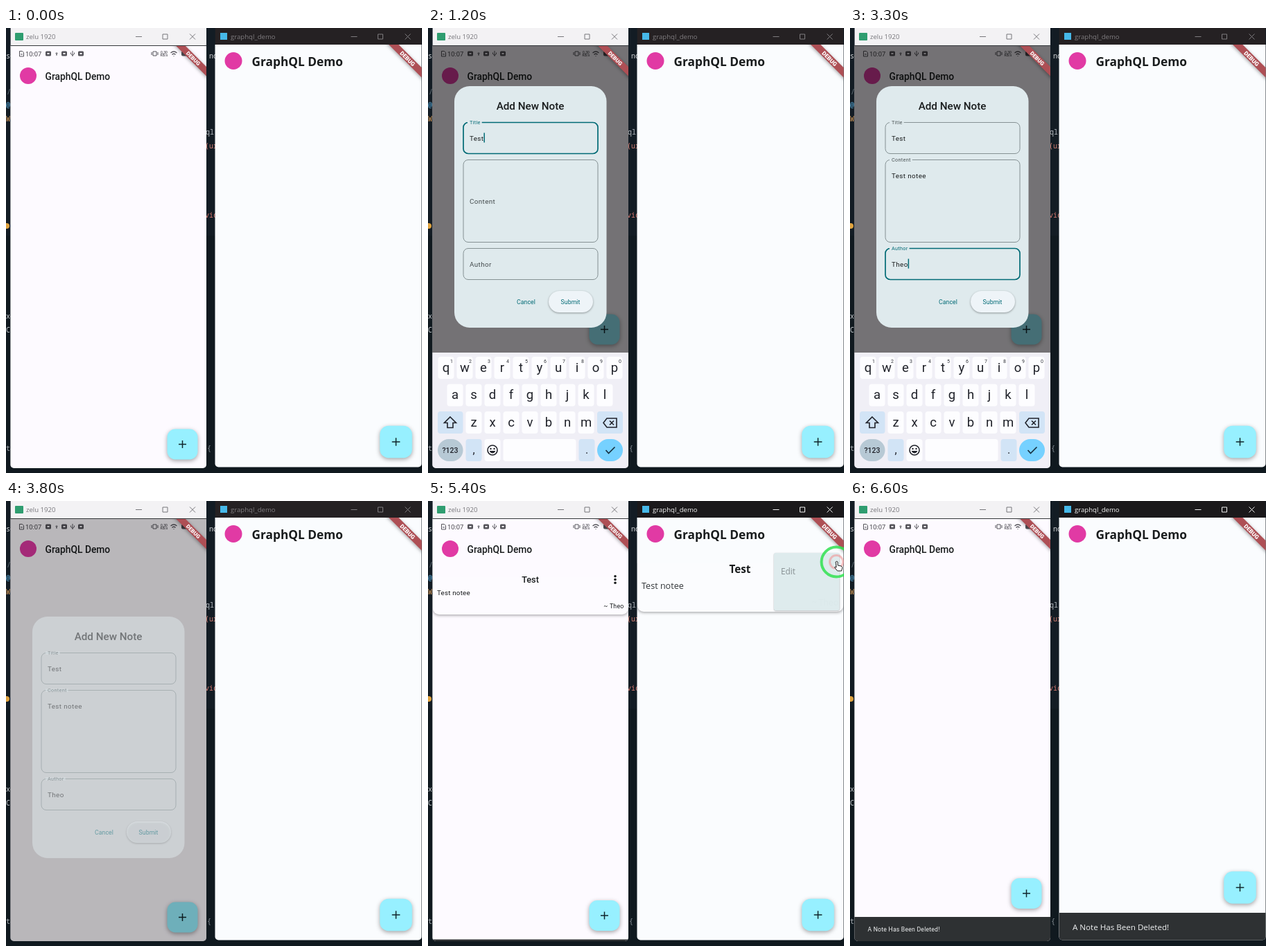
These frames come from a looping animation (600x643 px, 6900 ms). An HTML page with a canvas:

```html
<!DOCTYPE html>
<html lang="en">
<head>
<meta charset="utf-8">
<title>GraphQL Demo</title>
<style>
  html, body { margin: 0; width: 100%; height: 100%; overflow: hidden; background: #131c24; }
  canvas { display: block; }
</style>
</head>
<body>
<canvas id="stage" width="600" height="643"></canvas>
<script>
const c = document.getElementById('stage').getContext('2d');
const LOOP = 6900, STEP = 100;
const ROBOTO = 'Roboto, sans-serif', SANS = '"Open Sans", sans-serif', MONO = '"Noto Sans Mono", monospace';
const AUTHOR = 'Theo', TEAL = '#006a75', CYAN = '#97f0ff', INK = '#191c1d';

const ramp = (t, from, to) => {
  const p = Math.min(1, Math.max(0, (t - from) / (to - from)));
  return p * p * (3 - 2 * p);
};
// Rises over [a, b], falls over [d, e]
const pulse = (t, a, b, d, e) => ramp(t, a, b) * (1 - ramp(t, d, e));
const typed = (text, t, start) => text.slice(0, Math.max(0, Math.floor((t - start) / STEP) + 1));

function text(s, x, y, font, color, align = 'left', spacing = 0) {
  c.font = font;
  c.fillStyle = color;
  c.textAlign = align;
  c.letterSpacing = spacing + 'px';
  c.fillText(s, x, y);
}

function box(x, y, w, h, r, fill, shadow = 0) {
  c.save();
  if (shadow) {
    c.shadowColor = 'rgba(0,0,0,.36)';
    c.shadowBlur = shadow;
    c.shadowOffsetY = shadow / 3;
  }
  c.fillStyle = fill;
  c.beginPath();
  c.roundRect(x, y, w, h, r);
  c.fill();
  c.restore();
}

function dot(x, y, r, fill) {
  c.fillStyle = fill;
  c.beginPath();
  c.arc(x, y, r, 0, 7);
  c.fill();
}

function ring(x, y, r, color, width) {
  c.strokeStyle = color;
  c.lineWidth = width;
  c.beginPath();
  c.arc(x, y, r, 0, 7);
  c.stroke();
}

function path(d, color, width, x = 0, y = 0, fill) {
  c.save();
  c.translate(x, y);
  const p = new Path2D(d);
  if (fill) { c.fillStyle = fill; c.fill(p); }
  c.strokeStyle = color;
  c.lineWidth = width;
  c.stroke(p);
  c.restore();
}

function clipped(x, y, w, h, r, draw) {
  c.save();
  c.beginPath();
  c.roundRect(x, y, w, h, r);
  c.clip();
  draw();
  c.restore();
}

function windowBar(x, w, h, fill, color, name, nameColor, icon) {
  box(x, 0, w, h, 0, fill);
  box(...icon);
  text(name, x + 22.5, 16, '9.6px ' + SANS, nameColor);
  const r = x + w;
  path(`M${r - 102} 12.5h9M${r - 63} 9h7v7h-7zM${r - 24} 8.5l8 8m0-8l-8 8`, color, 1);
}

function banner(x, y, k) {
  c.save();
  c.translate(x, y);
  c.rotate(Math.PI / 4);
  c.scale(k, k);
  box(-60, 28, 120, 12, 0, '#ae4f55', 5);
  text('DEBUG', 0, 37.7, '800 10px ' + ROBOTO, '#fff', 'center');
  c.restore();
}

function fab(x, y, size) {
  box(x - size / 2, y - size / 2, size, size, size * .27, CYAN, 6);
  const arm = size / 8;
  path(`M${-arm} 0h${2 * arm}M0 ${-arm}v${2 * arm}`, '#10262b', 1.5, x, y);
}

function menuDots(x, y, gap) {
  for (const i of [-1, 0, 1]) dot(x, y + i * gap, 1.8, INK);
}

function backdrop() {
  box(0, 0, 600, 643, 0, '#131c24');
  box(0, 300, 600, 343, 0, '#10191f');
  const code = [
    ['se', 0, 44, '#d5d8da'], ['no', 293, 44, '#d5d8da'], ['/', 1, 96, '#64727b'],
    ['@', 0, 115, '#57a9d8'], ['W', 0, 135, '#e0a15c'], ['ql', 288, 154, '#b8bdc2'],
    ['(ur', 287, 174, '#d78075'], ['vic', 287, 274, '#d77a70'], ['xe', 0, 420, '#c3c8cc'],
    ['C', 0, 440, '#c3c8cc'], ['ta', 0, 611, '#a9b0b5'], ['{', 290, 611, '#8c959b']
  ];
  for (const [s, x, y, color] of code) text(s, x, y, '10px ' + MONO, color);
  dot(1, 286, 4, '#e0a33e');
}

function statusBar() {
  const grey = '#55545a';
  text('10:07', 28, 41, '9.4px ' + ROBOTO, '#45444a');
  path('M19.5 33.5h4l2 2v5.5h-6zM21 38h3', grey, 1);
  for (const x of [57, 80, 104]) {
    box(x, 33.5, 8, 7, 1.5, grey);
    box(x + 2.5, 36, 3, 2, 0, '#fdfaff');
  }
  path('M73 35v5M71.5 36.5l1.5 1.5 1.5-1.5M96 33v8M93.5 35.5v2l2.5 2 2.5-2v-2', grey, 1);
  path('M212 34h5v6h-5zM210 35v4M219 35v4', grey, 1);
  text('0.30', 228, 36.5, '500 5px ' + ROBOTO, grey, 'center');
  text('KB/s', 228, 41, '500 5px ' + ROBOTO, grey, 'center');
  path('M237.5 36q4.5-4 9 0M239.5 38.5q2.5-2.5 5 0M241.5 40.5h1', grey, 1.2);
  box(253, 33.5, 12, 7, 2, grey);
}

function field(label, value, x, y, h, focused, emptyY, valueY) {
  const active = focused || value;
  c.strokeStyle = focused ? TEAL : '#7b878a';
  c.lineWidth = focused ? 1.7 : .9;
  c.beginPath();
  c.roundRect(x, y, 194, h, 7);
  c.stroke();
  if (!active) return text(label, 60, emptyY, '9.8px ' + ROBOTO, '#434a4c', 'left', .4);
  c.font = '7.3px ' + ROBOTO;
  c.letterSpacing = '.3px';
  box(57, y - 2, c.measureText(label).width + 5, 4, 0, '#dfeaed');
  text(label, 60, y + 2.6, '7.3px ' + ROBOTO, focused ? TEAL : '#4a5254', 'left', .3);
  text(value, 60, valueY, '9.8px ' + ROBOTO, INK, 'left', .4);
  if (focused) box(60 + c.measureText(value).width, valueY - 11, 1.5, 14, 0, TEAL);
}

function dialog(t, kb) {
  const opacity = pulse(t, 200, 400, 3700, 3900);
  if (!opacity) return;
  c.save();
  c.globalAlpha = opacity;
  box(6, 25, 283, 611, 0, 'rgba(0,0,0,.54)');
  c.translate(0, 83 * (1 - kb));
  box(38, 84, 219.5, 349, 22, '#dfeaed');
  text('Add New Note', 147.5, 118, '500 15.2px ' + ROBOTO, INK, 'center');
  const focus = t < 500 || t >= 3500 ? -1 : t < 1400 ? 0 : t < 2800 ? 1 : 2;
  const content = typed(t < 2200 ? 'Test n' : 'Test notee', t, 1600);
  field('Title', typed('Test', t, 900), 51, 136.5, 45, focus === 0, 162.5, 162.5);
  field('Content', content, 51, 190.5, 119, focus === 1, 253.5, 216.5);
  field('Author', typed(AUTHOR, t, 3000), 51, 318.5, 45, focus === 2, 344.5, 344.5);
  box(174, 380, 64, 31, 16, '#eef4f8', 3);
  text('Cancel', 141.5, 398.5, '8.7px ' + ROBOTO, TEAL, 'center', .1);
  text('Submit', 205.5, 398.5, '8.7px ' + ROBOTO, TEAL, 'center', .1);
  c.restore();
}

function keyboard(kb, multiline) {
  if (!kb) return;
  const blue = '#d2e4f6', ink = '#20222a';
  c.save();
  c.translate(0, 167 * (1 - kb));
  box(6, 469, 283, 168, 0, '#f0eff6');
  const key = (x, y, w, fill = '#fdfdff', r = 4) => box(x, y - 16, w, 32, r, fill);
  ['qwertyuiop', 'asdfghjkl', 'zxcvbnm'].forEach((row, r) => [...row].forEach((ch, i) => {
    const x = [26, 39, 66][r] + 27 * i, y = 491 + 39.5 * r;
    key(x - 11.5, y, 23);
    text(ch, x, y + 5.5, '18.5px ' + ROBOTO, ink, 'center');
    if (!r) text((i + 1) % 10, x + 8, y - 7.5, '7px ' + ROBOTO, '#33353c', 'center');
  }));
  key(14, 570, 36.5, blue);
  key(244, 570, 37, blue);
  key(14, 610, 36.5, '#b7c9d5', 16);
  key(54.5, 610, 23, blue);
  key(81.5, 610, 23);
  key(108.5, 610, 105);
  key(217.5, 610, 23, blue);
  key(244, 610, 37, '#76d1ff', 16);
  path('M0 -8l8.5 8.5h-4.5v7h-8v-7h-4.5z', ink, 1.6, 32, 570);
  path('M-10 0l5-6.5h14v13h-14zM-1 -3l6 6m0-6l-6 6', ink, 1.6, 263, 570.5);
  text('?123', 32, 613.5, '500 10.5px ' + ROBOTO, ink, 'center');
  text(',', 66, 615, '16px ' + ROBOTO, ink, 'center');
  text('.', 229, 615, '16px ' + ROBOTO, ink, 'center');
  ring(93, 610, 7, ink, 1.6);
  dot(90.5, 608, 1.2, ink);
  dot(95.5, 608, 1.2, ink);
  path('M-4 1.5q4 5 8 0z', ink, 1, 93, 610, ink);
  path(multiline ? 'M7 -5v5h-13M-2 -4.5l-4.5 4.5 4.5 4.5' : 'M-6.5 0l4 4.5 9-9', '#173040', 1.7, 263, 610);
  c.restore();
}

function snack(x, y, w, h, shown, message, font, textY, spacing) {
  if (!shown) return;
  y += h * (1 - shown);
  box(x, y, w, h + 2, 0, '#2e3133');
  text(message, x + 19.5, y + textY, font, '#eff1f2', 'left', spacing);
}

function phone(t, message) {
  const kb = pulse(t, 500, 700, 3500, 3700);
  const shown = t < 5600 ? pulse(t, 3900, 4200, 5100, 5460) : ramp(t, 6000, 6300);
  clipped(6.4, 0, 282.6, 636, [0, 0, 5, 5], () => {
    box(6, 25, 283, 611, 0, '#fdfaff');
    statusBar();
    dot(32, 69, 12, '#e13aa4');
    text('GraphQL Demo', 56.5, 74.5, '500 13.8px ' + ROBOTO, INK);
    if (t >= 3900 && t < 6000) {
      clipped(6, 110, 283, 70, 0, () => box(7, 96, 282, 68, 9, '#fdfbff', 4));
      text('Test', 147.5, 117.5, '500 12.7px ' + ROBOTO, INK, 'center');
      text('Test notee', 13, 136, '9.8px ' + ROBOTO, INK, 'left', .2);
      text('~ ' + AUTHOR, 282.5, 155, '8.8px ' + ROBOTO, INK, 'right', .2);
      menuDots(270, 113.5, 4.7);
    }
    fab(254.5, 601.5 - 166 * kb - 34.5 * shown, 44);
    snack(6, 601, 283, 35, shown, message, '8.7px ' + ROBOTO, 20.5, .2);
    dialog(t, kb);
    keyboard(kb, t >= 1400 && t < 2800);
    banner(289, 25, .786);
    windowBar(6.4, 282.6, 25, '#f3f2f4', '#77777b', 'zelu 1920', '#77767b', [13, 7, 12, 11, 1, '#2f9d70']);
    box(6, 25, 283, 1, 0, '#34373a');
  });
}

function desktop(t, message) {
  const shown = t < 5600 ? pulse(t, 3900, 4200, 5100, 5400) : ramp(t, 6000, 6300);
  const focused = t >= 5200;
  const barInk = focused ? '#f2f2f2' : '#7f7c7f';
  clipped(301.5, 0, 298, 634.5, [0, 0, 5, 5], () => {
    box(301, 24, 299, 611, 0, '#fafcfe');
    dot(328, 47.5, 12.5, '#e13aa4');
    text('GraphQL Demo', 354.5, 54.5, '700 17.3px ' + SANS, INK);
    if (t >= 3900 && t < 6000) {
      clipped(301, 90, 299, 85, 0, () => box(302, 77, 297, 83, 9, '#fbfcfe', 4));
      text('Test', 450, 103.5, '700 15.2px ' + SANS, INK, 'center');
      text('Test notee', 308, 126.5, '12.6px ' + SANS, '#33373a');
      text('~ ' + AUTHOR, 592, 150.5, '12.2px ' + SANS, '#33373a', 'right');
      menuDots(582, 91, 5.5);
    }
    fab(562.5, 598 - 39.5 * shown, 46.5);
    snack(301.5, 595, 298, 39.5, shown, message, '11.6px ' + SANS, 25, 0);
    banner(599.5, 24, .84);
    windowBar(301.5, 298, 24, focused ? '#1b191b' : '#252123', barInk,
      'graphql_demo', barInk, [309, 7, 10, 10, 0, '#46b8e8']);
  });
}

function popup(t) {
  const shown = pulse(t, 5200, 5420, 5800, 6000);
  if (!shown) return;
  const open = ramp(t, 5180, 5470);
  c.save();
  c.globalAlpha = shown;
  box(499, 75, 94.5, 20 + 74 * open, 3, '#e0edef', 2);
  text('Edit', 509, 106, '11.8px ' + SANS, t < 5500 ? '#848d90' : INK);
  c.globalAlpha *= ramp(t, 5400, 5600);
  text('Delete', 509, 146, '11.8px ' + SANS, INK);
  c.restore();
}

function pointer(t) {
  if (t < 5100 || t >= 6300) return;
  const enter = ramp(t, 5000, 5300), move = ramp(t, 5400, 5700);
  const x = 589 + 18 * (1 - enter) - 55 * move;
  const y = 88 + 45 * (1 - enter) + 53 * move;
  const clickAge = t - (t < 5600 ? 5300 : 5700);
  if (clickAge >= 0 && clickAge < 200) {
    ring(x, y, 14 + clickAge * .075, 'rgba(50,226,82,.85)', 4);
    ring(x, y, 9.5, 'rgba(240,150,150,.6)', 3);
  }
  path('M-1 0q1.5-1.5 3 0v5l5 1q2 1 1.5 3l-1 4h-6l-4-5q0-2 2.5 0z', '#222', 1, x, y, '#fff');
}

function frame(now) {
  const t = Math.floor(now % LOOP / STEP) * STEP;
  const message = t < 5800 ? 'New Note Created!' : 'A Note Has Been Deleted!';
  backdrop();
  phone(t, message);
  desktop(t, message);
  popup(t);
  pointer(t);
  requestAnimationFrame(frame);
}

requestAnimationFrame(frame);
</script>
</body>
</html>
```
